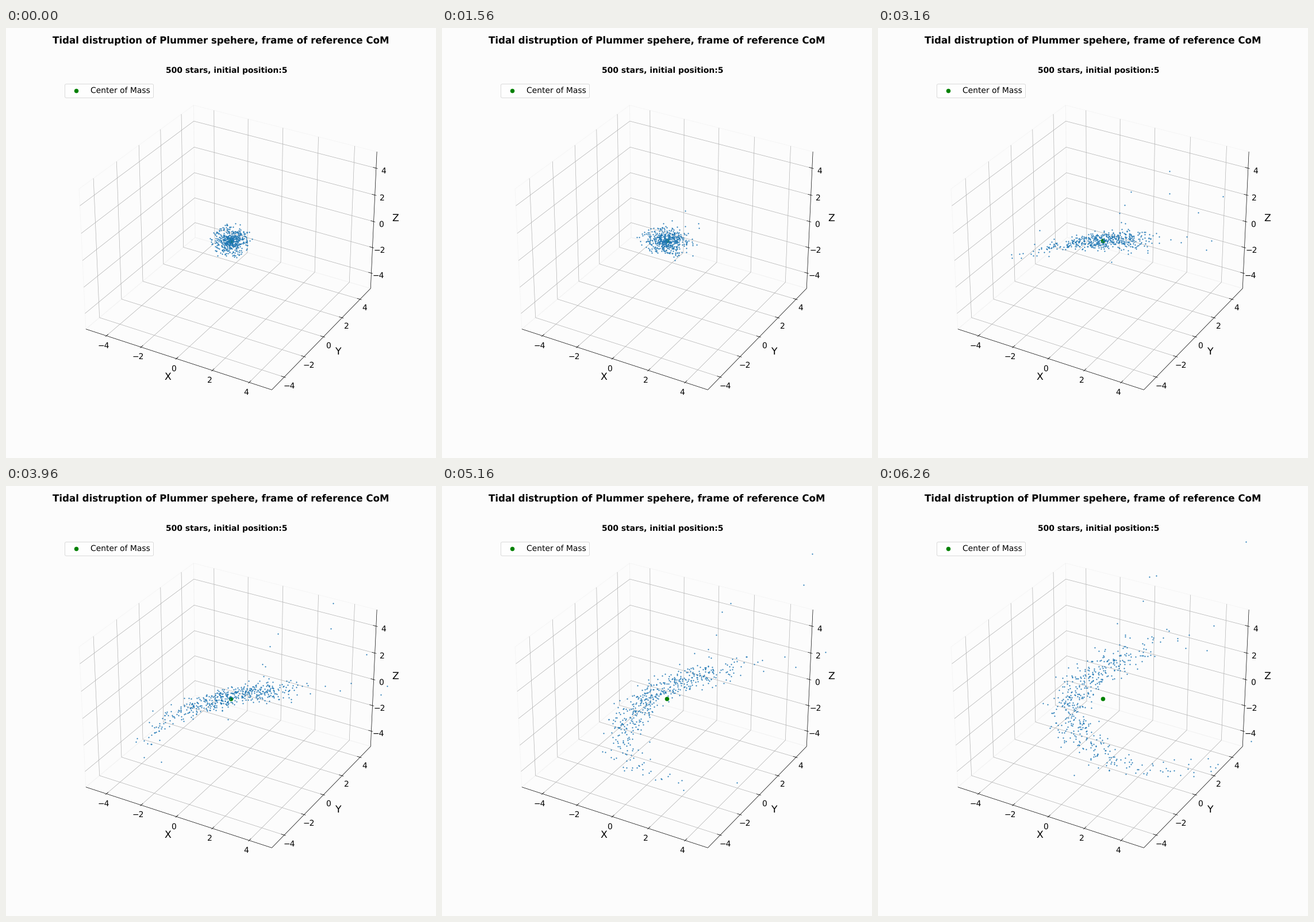
Recreate the animation shown at these times as a matplotlib script. Size 748 px wide and 748 px high, loop 6.41 s.

```python
import numpy as np
import matplotlib.pyplot as plt
from matplotlib.animation import FuncAnimation
from matplotlib.collections import LineCollection
from matplotlib.patches import Rectangle

SIZE, INCHES = 748, 12
BG = "#fcfcfc"
LOOP_MS, TICK_MS = 6410, 10
HOLD_MS, STEP_MS, STEPS = 760, 100, 56

# Square plot area in pixels (y up) and the point where the origin lands
BOX = 0.77 * SIZE
LEFT, BOTTOM = 0.5125 * SIZE - BOX / 2, 0.11 * SIZE
ORIGIN = np.array([LEFT, BOTTOM]) + BOX * 0.095 / 0.185
ZOOM = BOX / 0.185
DIST = 10
ELEV, AZIM = np.radians(30), np.radians(-60)
WORLD = np.array([1, 1, 0.75]) * 0.8 / 7

LIM = 5 + 10 / 48
DELTA = 10 / 12
TICKS = (-4, -2, 0, 2, 4)

plt.rcParams.update({"font.family": "DejaVu Sans", "font.size": 16,
                     "text.hinting": "no_hinting"})


def project(points):
    """Perspective view of data points, in stage pixels."""
    p = np.asarray(points, float) * WORLD
    ce, se, ca, sa = np.cos(ELEV), np.sin(ELEV), np.cos(AZIM), np.sin(AZIM)
    right = p @ [-sa, ca, 0]
    up = p @ [-se * ca, -se * sa, ce]
    depth = DIST - p @ [ce * ca, ce * sa, se]
    return ORIGIN + ZOOM * np.stack([right, up], -1) / depth[..., None]


def add_lines(ax, lines, color, width, zorder):
    ax.add_collection(LineCollection([project(line) for line in lines],
                                     colors=color, linewidths=width, zorder=zorder))


def draw_box(ax):
    lo, hi = -LIM, LIM
    panes = [
        [(lo, lo, lo), (lo, hi, lo), (lo, hi, hi), (lo, lo, hi), (lo, lo, lo)],
        [(lo, hi, lo), (hi, hi, lo), (hi, hi, hi), (lo, hi, hi), (lo, hi, lo)],
        [(lo, lo, lo), (hi, lo, lo), (hi, hi, lo), (lo, hi, lo), (lo, lo, lo)],
    ]
    add_lines(ax, panes, (0.94, 0.94, 0.94, 0.6), 1, 0)

    grid = []
    for t in TICKS:
        grid.append([(t, lo, lo), (t, hi, lo), (t, hi, hi)])
        grid.append([(hi, t, lo), (lo, t, lo), (lo, t, hi)])
        grid.append([(lo, lo, t), (lo, hi, t), (hi, hi, t)])
    add_lines(ax, grid, "#b0b0b0", 0.8, 1)

    edges = [
        [(lo, lo, lo), (hi, lo, lo)],
        [(hi, lo, lo), (hi, hi, lo)],
        [(hi, hi, lo), (hi, hi, hi)],
    ]
    out, inn = LIM + 0.1 * DELTA, LIM - 0.2 * DELTA
    marks = []
    for t in TICKS:
        marks.append([(t, -out, lo), (t, -inn, lo)])
        marks.append([(out, t, lo), (inn, t, lo)])
        marks.append([(out, hi, t), (inn, hi, t)])
    add_lines(ax, edges + marks, "black", 0.8, 1.5)


def axis_point(axis, value, pad):
    """Point beside an axis, pushed away from the box by pad."""
    d = LIM + pad
    return project([(value, -d, -d), (d, value, -d), (d, d, value)][axis])


def draw_labels(ax):
    for axis, name in enumerate("XYZ"):
        ax.text(*axis_point(axis, 0, 0.8), name, fontsize=20,
                ha="center", va="center")
        for t in TICKS:
            ax.text(*axis_point(axis, t, 0.27), str(t).replace("-", "\u2212"),
                    ha="center", va="top")


def simulate(n=500, substeps=10):
    """Cluster on a circular orbit around a point mass, seen from its mean."""
    rng = np.random.default_rng(12)
    orbit, omega = 5.0, np.radians(3.35)
    gm = omega ** 2 * orbit ** 3

    core, r_max = 0.6, 1.1
    mass = (r_max ** 2 / (r_max ** 2 + core ** 2)) ** 1.5
    r = core / np.sqrt(rng.uniform(0.001, mass, n) ** (-2 / 3) - 1)
    direction = rng.normal(size=(n, 3))
    direction /= np.linalg.norm(direction, axis=1, keepdims=True)
    pos = r[:, None] * direction + [orbit, 0, 0]

    vel = rng.normal(0, 0.22 * omega, (n, 3))
    fast = 16
    vel[:fast] = rng.normal((0.5, 0.7, 1.1), 1.2, (fast, 3)) * omega
    vel += [0, orbit * omega, 0]

    def pull(p):
        return -gm * p / ((p ** 2).sum(1, keepdims=True) + 0.1) ** 1.5

    dt = 1 / substeps
    track = [pos - pos.mean(0)]
    for _ in range(STEPS):
        for _ in range(substeps):
            vel = vel + pull(pos) * dt / 2
            pos = pos + vel * dt
            vel = vel + pull(pos) * dt / 2
        track.append(pos - pos.mean(0))
    return project(np.array(track))


fig = plt.figure(figsize=(INCHES, INCHES), dpi=SIZE / INCHES, facecolor=BG)
ax = fig.add_axes([0, 0, 1, 1])
ax.set(xlim=(0, SIZE), ylim=(0, SIZE))
ax.set_axis_off()

fig.suptitle("Tidal distruption of Plummer spehere, frame of reference CoM",
             fontsize=19.2, fontweight="bold")
fig.text(0.5125, 670 / SIZE, "500 stars, initial position:5",
         ha="center", va="baseline", fontweight="bold")
draw_box(ax)
draw_labels(ax)

track = simulate()
ax.scatter(*ORIGIN, s=60, color="green", zorder=2, label="Center of Mass")
stars = ax.scatter(*track[0].T, s=2, color="#1f77b4", zorder=3)
stars.set_clip_path(Rectangle((LEFT, BOTTOM), BOX, BOX, transform=ax.transData))
ax.legend(loc="upper left",
          bbox_to_anchor=(LEFT / SIZE, BOTTOM / SIZE, BOX / SIZE, BOX / SIZE))


def update(i):
    t = i * TICK_MS
    step = 0 if t < HOLD_MS else min(STEPS, (t - HOLD_MS) // STEP_MS + 1)
    stars.set_offsets(track[step])
    return [stars]


anim = FuncAnimation(fig, update, frames=LOOP_MS // TICK_MS, interval=TICK_MS,
                     repeat=True, repeat_delay=0, blit=False)
plt.show()
```
